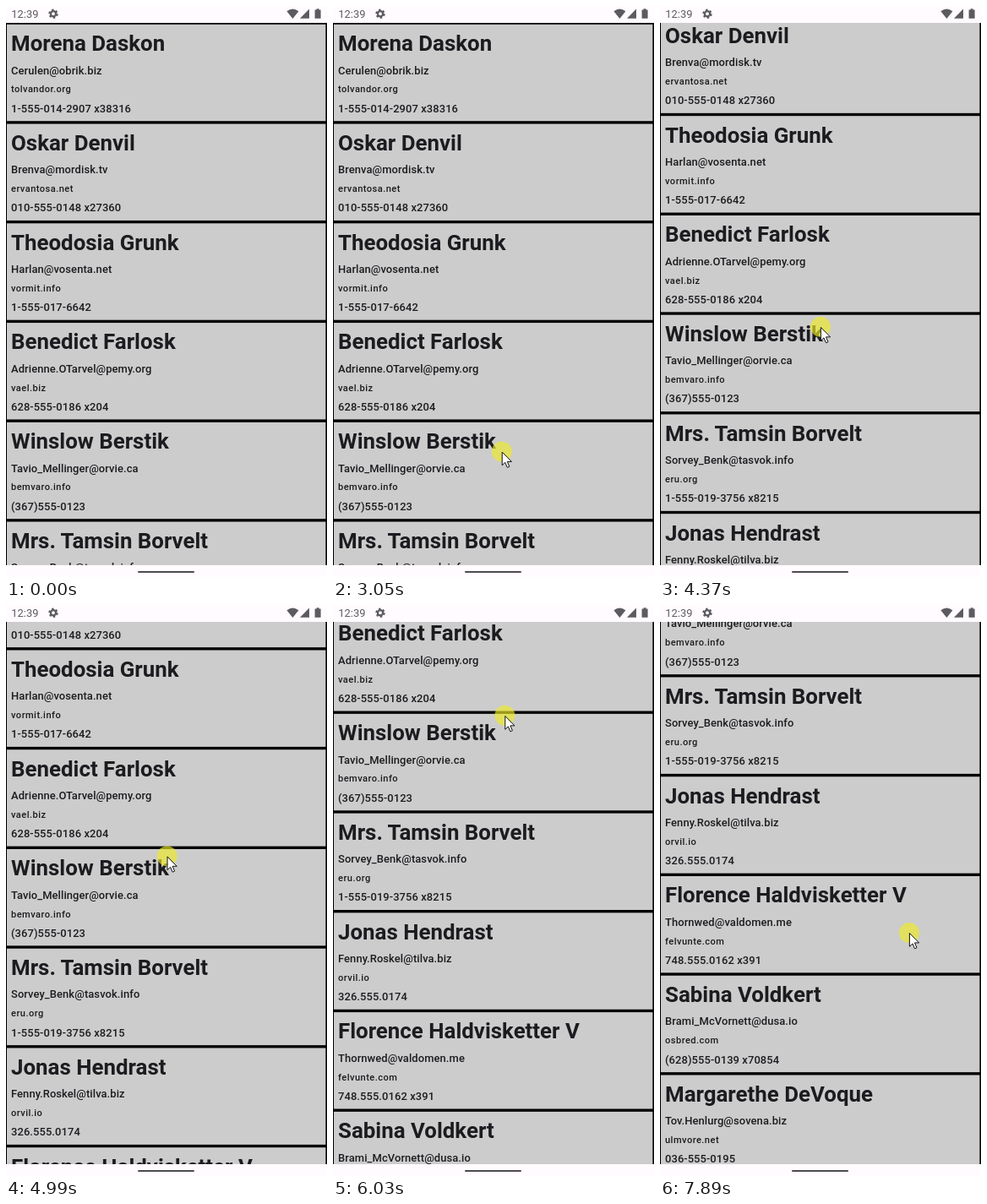
Recreate the animation shown at these times as an HTML page. Size 380 px wide and 676 px high, loop 7990 ms.

```html
<!DOCTYPE html>
<html lang="en">
<head>
<meta charset="utf-8">
<title>Contact list</title>
<style>
  html, body { margin: 0; width: 100%; height: 100%; overflow: hidden; background: #fffbfe; }
  svg { display: block; }
  text { font-family: Roboto, sans-serif; font-weight: 500; fill: #1c1b1f; }
  .name { font-size: 25.87px; font-weight: 700; }
  .mail, .phone { font-size: 12.94px; letter-spacing: .09px; }
  .site { font-size: 11.09px; letter-spacing: .46px; }
  .clock { font-size: 12.9px; font-weight: 400; fill: #5c5b60; }
  .icons { fill: #5c5b60; }
</style>
</head>
<body>
<svg width="380" height="676" viewBox="0 0 380 676">
  <rect width="380" height="676" fill="#fffbfe"/>
  <svg y="20" width="380" height="642" overflow="hidden">
    <rect width="380" height="642"/>
    <g id="list"></g>
  </svg>

  <text class="clock" x="6.3" y="14">12:39</text>
  <g class="icons">
    <g fill="none" stroke="#5c5b60">
      <circle cx="56" cy="9.3" r="3.1" stroke-width="2.3"/>
      <circle cx="56" cy="9.3" r="4.7" stroke-width="2" stroke-dasharray="2.46"/>
    </g>
    <path d="M339.4 15 L332.4 6.2 Q339.4 .8 346.4 6.2 Z"/>
    <path d="M348 14.7 H359 V3.5 Z"/>
    <path d="M365.6 4.4 H367.6 V3.2 H370.6 V4.4 H372.6 V14.8 H365.6 Z"/>
  </g>
  <rect x="156" y="669" width="67" height="2" rx="1" fill="#4b4a4d"/>

  <g id="pointer">
    <circle id="press" r="12" fill="#eeeb24" fill-opacity=".65"/>
    <path d="M.4 .6 V16.4 L4 13 L6.5 18.9 L9 17.8 L6.5 12 H11.6 Z"
          fill="#fff" stroke="#111" stroke-width="1" stroke-linejoin="round"/>
  </g>
</svg>
<script>
const DURATION = 7990;
const PITCH = 117.75;
const FIELDS = [["name", 33.2], ["mail", 60.5], ["site", 82.4], ["phone", 105.6]];

const contacts = [
  ["Morena Daskon", "Cerulen@obrik.biz", "tolvandor.org", "1-555-014-2907 x38316"],
  ["Oskar Denvil", "Brenva@mordisk.tv", "ervantosa.net", "010-555-0148 x27360"],
  ["Theodosia Grunk", "Harlan@vosenta.net", "vormit.info", "1-555-017-6642"],
  ["Benedict Farlosk", "Adrienne.OTarvel@pemy.org", "vael.biz", "628-555-0186 x204"],
  ["Winslow Berstik", "Tavio_Mellinger@orvie.ca", "bemvaro.info", "(367)555-0123"],
  ["Mrs. Tamsin Borvelt", "Sorvey_Benk@tasvok.info", "eru.org", "1-555-019-3756 x8215"],
  ["Jonas Hendrast", "Fenny.Roskel@tilva.biz", "orvil.io", "326.555.0174"],
  ["Florence Haldvisketter V", "Thornwed@valdomen.me", "felvunte.com", "748.555.0162 x391"],
  ["Sabina Voldkert", "Brami_McVornett@dusa.io", "osbred.com", "(628)555-0139 x70854"],
  ["Margarethe DeVoque", "Tov.Henlurg@sovena.biz", "ulmvore.net", "036-555-0195"]
];

// Keys are [time, value...]
const scrollKeys = [
  [0, 0], [3060, 0], [3570, 46.3], [4370, 127], [5630, 294.5],
  [6130, 382], [6500, 451], [7000, 480], [7360, 480], [7890, 525], [7990, 531]
];
const pointerKeys = [
  [500, 203, 678], [900, 209, 530], [1300, 216, 442], [1500, 221, 443],
  [1770, 217, 451], [2130, 207, 474], [2500, 211, 508], [2890, 201, 531],
  [2980, 200, 530], [3570, 199, 473], [4370, 190, 380], [5630, 192.5, 204],
  [6130, 207, 120], [6300, 214, 112], [6500, 218.5, 115], [7000, 272, 350],
  [7240, 296, 442], [7300, 296, 440], [7890, 295, 388], [7990, 295, 381]
];
const presses = [[2950, 6130], [7290, DURATION]];

const list = document.getElementById("list");
const pointer = document.getElementById("pointer");
const press = document.getElementById("press");

function add(parent, tag, attrs, content = "") {
  const el = document.createElementNS("http://www.w3.org/2000/svg", tag);
  for (const key in attrs) el.setAttribute(key, attrs[key]);
  el.textContent = content;
  return parent.appendChild(el);
}

contacts.forEach((contact, i) => {
  const row = add(list, "g", { transform: `translate(0 ${i * PITCH})` });
  add(row, "rect", { x: 1, y: 1.8, width: 377.4, height: 114.4, fill: "#ccc" });
  FIELDS.forEach(([kind, y], j) => add(row, "text", { class: kind, x: 6, y }, contact[j]));
});

// Monotone cubic interpolation through the keys
function sample(keys, t, column) {
  const last = keys.length - 1;
  if (t <= keys[0][0]) return keys[0][column];
  if (t >= keys[last][0]) return keys[last][column];
  const slope = k => (keys[k + 1][column] - keys[k][column]) / (keys[k + 1][0] - keys[k][0]);
  const tangent = k => {
    if (k === 0) return slope(0);
    if (k === last) return slope(last - 1);
    const a = slope(k - 1), b = slope(k);
    return a * b > 0 ? 2 * a * b / (a + b) : 0;
  };
  const i = keys.findIndex(key => key[0] > t) - 1;
  const span = keys[i + 1][0] - keys[i][0];
  const u = (t - keys[i][0]) / span;
  const v = 1 - u;
  return keys[i][column] * (1 + 2 * u) * v * v + keys[i + 1][column] * u * u * (3 - 2 * u)
    + span * u * v * (tangent(i) * v - tangent(i + 1) * u);
}

function render(t) {
  list.setAttribute("transform", `translate(0 ${-sample(scrollKeys, t, 1)})`);
  pointer.setAttribute("transform",
    `translate(${sample(pointerKeys, t, 1)} ${sample(pointerKeys, t, 2)})`);
  const pressed = presses.some(([from, to]) => t >= from && t < to);
  press.setAttribute("visibility", pressed ? "visible" : "hidden");
}

const start = performance.now();
function tick() {
  render((performance.now() - start) % DURATION);
  requestAnimationFrame(tick);
}
tick();
</script>
</body>
</html>
```
